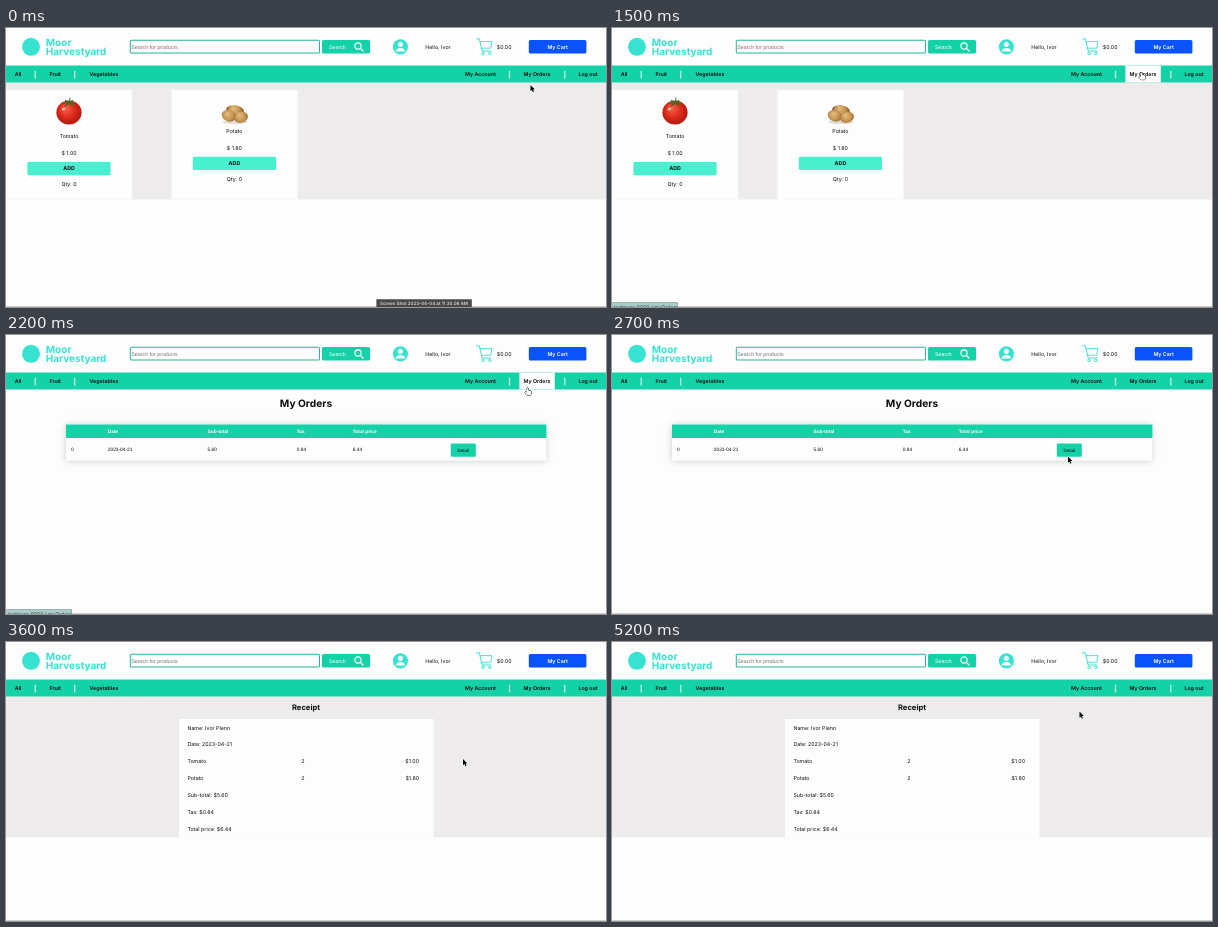
Recreate the animation shown at these times as an HTML page with a canvas. Size 600 by 279 pixels, loop 5300 ms.

```html
<!DOCTYPE html>
<html lang="en">
<head>
<meta charset="utf-8">
<title>Produce shop</title>
<style>
html, body { margin: 0; width: 100%; height: 100%; overflow: hidden; background: #fdfdfd; }
canvas { display: block; width: 600px; height: 279px; }
</style>
</head>
<body>
<canvas id="stage"></canvas>
<script>
const W = 600, H = 279, LOOP = 5300, STEP = 100;
const PAPER = '#fdfdfd', GREY = '#eeebec', TEAL = '#14d1a8', MINT = '#48f0d0', AQUA = '#38e2d0', INK = '#0c0c0c';
const UI = 'Inter, "Open Sans", sans-serif';
const PLAIN = '"Liberation Sans", Arial, sans-serif';

const canvas = document.getElementById('stage');
const ratio = window.devicePixelRatio || 1;
canvas.width = W * ratio;
canvas.height = H * ratio;
const c = canvas.getContext('2d');

// Time, x and y of the pointer tip
const POINTER = [
  [0, 524.5, 57], [300, 529, 47], [500, 529, 47], [800, 534.5, 39.5], [900, 534.5, 39.5],
  [1500, 529.5, 44.5], [2100, 521.5, 53], [2200, 521.5, 53], [2700, 456, 121.5],
  [2900, 457, 117], [4800, 457, 117], [5200, 467.5, 69.5]
];

function pointerAt(t) {
  let i = 0;
  while (i < POINTER.length - 2 && t > POINTER[i + 1][0]) i++;
  const [t0, x0, y0] = POINTER[i], [t1, x1, y1] = POINTER[i + 1];
  const k = Math.min(1, (t - t0) / (t1 - t0));
  return [x0 + (x1 - x0) * k, y0 + (y1 - y0) * k];
}

function box(x, y, x2, y2, fill, radius = 0) {
  c.fillStyle = fill;
  c.beginPath();
  c.roundRect(x, y, x2 - x, y2 - y, radius);
  c.fill();
}

function oval(x, y, rx, ry, fill, turn = 0) {
  c.fillStyle = fill;
  c.beginPath();
  c.ellipse(x, y, rx, ry, turn, 0, Math.PI * 2);
  c.fill();
}

function line(points, color, width) {
  c.strokeStyle = color;
  c.lineWidth = width;
  c.lineCap = c.lineJoin = 'round';
  c.beginPath();
  points.forEach(([x, y]) => c.lineTo(x, y));
  c.stroke();
}

// Text is set at page size and scaled down, centred vertically on y
function text(str, x, y, { size = 5.3, weight = 500, color = INK, align = 'left', font = UI } = {}) {
  c.save();
  c.translate(x, y + size * 0.36);
  c.scale(1 / 3, 1 / 3);
  c.font = `${weight} ${size * 3}px ${font}`;
  c.textRendering = 'geometricPrecision';
  c.textAlign = align;
  c.fillStyle = color;
  c.fillText(str, 0, 0);
  c.restore();
}

function header() {
  oval(25, 18.8, 9, 9, AQUA);
  const word = { size: 10, weight: 700, color: AQUA };
  text('Moor', 39.8, 14.5, word);
  text('Harvestyard', 39.8, 23.7, word);

  box(123.8, 11.8, 314, 25.6, '#27b596', 1.5);
  box(124.8, 12.8, 313, 24.6, PAPER, 0.5);
  text('Search for products', 125.3, 18.7, { weight: 400, color: '#757575', font: PLAIN });

  box(316, 12, 364, 25.6, TEAL, 1.5);
  text('Search', 323, 18.8, { weight: 400, color: '#fff', font: PLAIN });
  c.strokeStyle = '#fff';
  c.lineWidth = 1.1;
  c.beginPath();
  c.arc(352, 18, 3.1, 0, Math.PI * 2);
  c.stroke();
  line([[354.4, 20.4], [357, 23]], '#fff', 1.3);

  oval(394.4, 18.8, 7.6, 7.6, AQUA);
  oval(394.4, 16.3, 2.4, 2.6, PAPER);
  c.beginPath();
  c.moveTo(389.6, 23.6);
  c.quadraticCurveTo(390.2, 20, 394.4, 20);
  c.quadraticCurveTo(398.6, 20, 399.2, 23.6);
  c.closePath();
  c.fill();

  text('Hello, Ivor', 419.3, 19, { weight: 400 });

  line([[470.4, 10.8], [473.3, 10.8], [476.2, 23], [484.8, 23]], AQUA, 1);
  line([[474, 13.6], [486, 13.6], [484.8, 20.2], [475.5, 20.2]], AQUA, 0.9);
  for (const x of [477, 483.8]) {
    c.beginPath();
    c.arc(x, 25.4, 1.3, 0, Math.PI * 2);
    c.stroke();
  }
  text('$0.00', 490.8, 19, { weight: 400 });

  box(522.8, 12, 580.4, 25.6, '#0a52fb', 1.5);
  text('My Cart', 551.6, 18.8, { weight: 600, color: '#fff', align: 'center' });
}

function nav(hover) {
  box(0, 37.4, W, 54.5, TEAL);
  if (hover) box(513.4, 37.4, 548.8, 54.5, PAPER);
  const items = [['All', 8.8], ['Fruit', 43.4], ['Vegetables', 83.5], ['My Account', 459], ['My Orders', 517.5], ['Log out', 572.4]];
  for (const [label, x] of items) text(label, x, 46, { weight: 600 });
  for (const x of [29.2, 68.7, 503.5, 558.8]) box(x - 0.6, 42.8, x + 0.6, 50.5, '#c9f7ea');
}

function tomato() {
  const g = c.createRadialGradient(59, 80, 1, 63, 84, 14);
  g.addColorStop(0, '#f5604a');
  g.addColorStop(0.5, '#e02d1c');
  g.addColorStop(1, '#a9140c');
  oval(63, 84.6, 12.6, 12, g);
  for (const a of [-2.9, -2.2, -0.9, -0.2, 0.7, 2.3]) {
    line([[63, 75], [63 + 6 * Math.cos(a), 75.4 + 3.6 * Math.sin(a)]], '#3c6b25', 1.2);
  }
  line([[63, 75], [64, 70]], '#4d7a2c', 1.1);
  oval(57.5, 81, 1.8, 1.1, '#ffc4b6', -0.5);
}

function potatoes() {
  oval(229, 94, 12.5, 2, '#e2dcd5');
  const shapes = [[229, 82.5, 9, 5.2, 0.15], [222.8, 87.8, 7.2, 5.6, 0.35], [235, 89.2, 7, 5.5, -0.25]];
  for (const [x, y, rx, ry, turn] of shapes) {
    const g = c.createRadialGradient(x - 1.5, y - 2, 1, x, y, 8.5);
    g.addColorStop(0, '#e0b878');
    g.addColorStop(0.55, '#c3924f');
    g.addColorStop(1, '#845423');
    oval(x, y, rx, ry, g, turn);
  }
}

function card(x, mid, y, name, price) {
  box(x, 62, x + 126, 171.6, PAPER);
  const center = { align: 'center', weight: 400 };
  text(name, mid, y, center);
  text(price, mid, y + 17, center);
  box(mid - 41.6, y + 25.4, mid + 41.6, y + 38.8, MINT, 1);
  text('ADD', mid, y + 32, { align: 'center', weight: 700 });
  text('Qty: 0', mid, y + 47.4, center);
}

function shopPage() {
  box(0, 54.5, W, 171.6, GREY);
  card(0, 63, 108.5, 'Tomato', '$ 1.00');
  card(165.5, 228.4, 103.3, 'Potato', '$ 1.80');
  tomato();
  potatoes();
}

function ordersPage() {
  text('My Orders', 300, 68, { size: 10.2, weight: 700, align: 'center' });
  c.save();
  c.shadowColor = 'rgba(0,0,0,0.2)';
  c.shadowBlur = 6.5 * ratio;
  box(60, 89.5, 540.4, 125.8, PAPER);
  c.restore();
  box(60, 89.5, 540.4, 103, TEAL);
  const columns = [['', '0', 65], ['Date', '2023-04-21', 101.8], ['Sub-total', '5.60', 201.5], ['Tax', '0.84', 290.8], ['Total price', '6.44', 346.8]];
  for (const [head, cell, x] of columns) {
    text(head, x, 96.4, { size: 4.8, weight: 700, color: '#fff', font: PLAIN });
    text(cell, x, 114.3, { size: 4.8, weight: 400, font: PLAIN });
  }
  box(444.8, 108.6, 469.8, 121.7, TEAL, 1);
  text('Detail', 457.3, 115.1, { size: 4.45, weight: 400, align: 'center', font: PLAIN });
}

function receiptPage(loaded) {
  const rows = loaded
    ? [['Name: Ivor Plenn'], ['Date: 2023-04-21'], ['Tomato', '2', '$1.00'], ['Potato', '2', '$1.80'],
       ['Sub-total: $5.60'], ['Tax: $0.84'], ['Total price: $6.44']]
    : [['Name:'], ['Date:'], ['Sub-total: $0'], ['Tax: $'], ['Total price: $']];
  const bottom = 77 + rows.length * 16.9;
  box(0, 54.5, W, bottom, GREY);
  box(173, 77, 427.4, bottom, PAPER);
  text('Receipt', 300, 65.6, { size: 7.6, weight: 700, align: 'center' });
  rows.forEach(([label, count, price], i) => {
    const y = 85.6 + i * 16.9;
    text(label, 181.4, y, { weight: 400 });
    if (!count) return;
    text(count, 295.3, y, { weight: 400 });
    text(price, 413, y, { weight: 400, align: 'right' });
  });
}

function shape(points, x, y, fill, edge, width) {
  c.beginPath();
  points.forEach(([px, py]) => c.lineTo(x + px, y + py));
  c.closePath();
  c.lineJoin = 'round';
  c.lineWidth = width;
  c.strokeStyle = edge;
  c.stroke();
  c.fillStyle = fill;
  c.fill();
}

function pointer(x, y, hand) {
  if (hand) {
    shape([[-0.8, 0.4], [0, -0.1], [0.8, 0.4], [0.9, 2.4], [3.6, 3], [4, 4], [3.2, 7.2], [-0.6, 7.2], [-2.7, 4.4], [-2, 3.8], [-0.8, 4.6]],
      x, y, '#fff', '#111', 1);
  } else {
    shape([[0, 0], [0, 6.2], [1.4, 5], [2.4, 7.3], [3.4, 6.8], [2.5, 4.6], [4.4, 4.5]], x, y, '#000', '#fff', 0.8);
  }
}

function draw(t) {
  c.setTransform(ratio, 0, 0, ratio, 0, 0);
  box(0, 0, W, H, PAPER);
  const hover = t >= 1000 && t < 2300;

  if (t < 1700) shopPage();
  else if (t < 2900) ordersPage();
  else receiptPage(t >= 3300);

  header();
  nav(hover);

  box(0, 278, W, H, '#cfcfcf');
  if (t < 600) {
    box(370.4, 271.3, 465.8, H, '#484848');
    text('Screen Shot 2023-04-04 at 11.30.08 AM', 418, 275.2, { size: 4.55, color: '#e8e8e8', align: 'center' });
  }
  if (hover) {
    box(0, 274.3, 66, H, '#7f9a97', 1);
    box(0, 274.9, 65.4, H, '#a8cdc8', 1);
    text('testpage 0000 / myOrders', 2, 279, { size: 5.1, weight: 400, color: '#333' });
  }
  pointer(...pointerAt(t), hover);
}

function tick() {
  const t = performance.now() % LOOP;
  draw(Math.floor(t / STEP) * STEP);
  requestAnimationFrame(tick);
}
tick();
</script>
</body>
</html>
```
